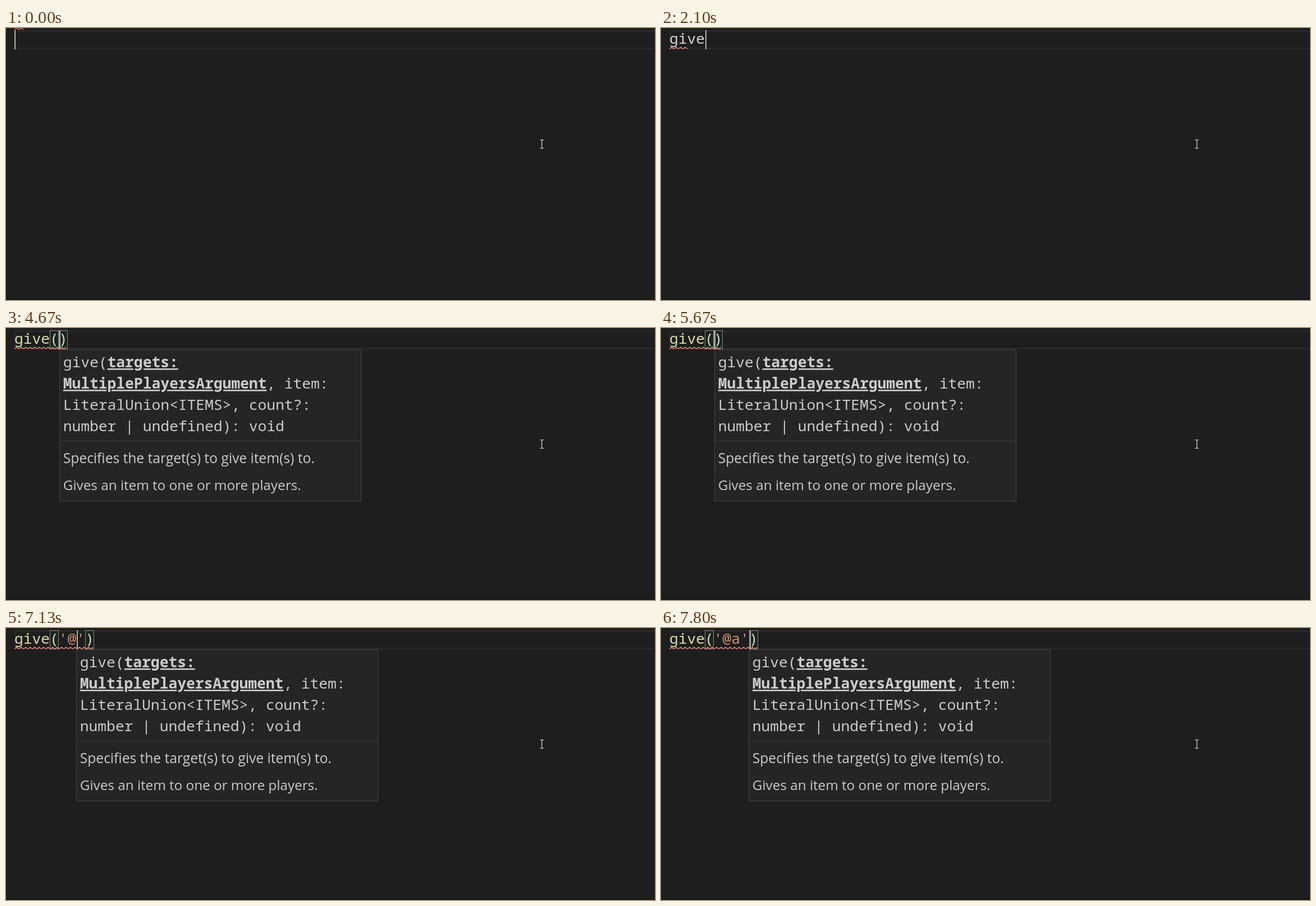
An HTML page for the animation above (8 s loop, 1156 by 485 pixels).

```html
<!DOCTYPE html>
<html lang="en">
<head>
<meta charset="utf-8">
<title>Typing a function call</title>
<style>
html, body { margin: 0; width: 100%; height: 100%; overflow: hidden; background: #1e1e1e; }
svg { display: block; width: 1156px; height: 485px; }
text { white-space: pre; }
.code { font: 26.27px "Noto Sans Mono", "DejaVu Sans Mono", monospace; fill: #d4d4d4; font-variant-ligatures: none; }
.doc { font: 24.6px "Open Sans", "Noto Sans", sans-serif; fill: #cccccc; }
.note { font-size: 24.25px; }
.tip { fill: #cccccc; }
.active { font-weight: 700; text-decoration: underline; text-decoration-thickness: 2px; }
.squiggle { fill: none; stroke: #f48771; stroke-width: 1.3; }
.bracket { fill: rgba(0, 100, 0, .1); stroke: #888888; stroke-width: 1; }
.panel { fill: #252526; stroke: #454545; }
</style>
</head>
<body>
<svg viewBox="0 0 1156 485">
  <rect width="1156" height="485" fill="#1e1e1e"/>
  <path d="M1156 5.5H16.5V36.5H1156" fill="none" stroke="#282828" stroke-width="3"/>
  <rect y="482" width="1156" height="3" fill="#1a1a1a"/>

  <g id="list">
    <rect class="panel" x="15.5" y="38.5" width="836" height="409"/>
    <rect x="16" y="39" width="835" height="34" fill="#062f4a"/>
    <text class="code" x="57" y="64"><tspan fill="#18a3ff" font-weight="700">gi</tspan>ve</text>
  </g>

  <rect id="open" class="bracket" y="4.5" width="15" height="33"/>
  <rect id="close" class="bracket" y="4.5" width="15" height="33"/>
  <text id="line" class="code" x="15" y="28"></text>
  <path id="oldError" class="squiggle"/>
  <path id="error" class="squiggle"/>
  <rect id="caret" y="4" width="2" height="34" fill="#aeafad"/>

  <g id="tip">
    <rect class="panel" x=".5" y="38.5" width="537" height="270"/>
    <path d="M1 201.5H537" stroke="#3a3a3b"/>
    <g class="code">
      <text class="tip" x="6.8" y="70">give(<tspan class="active">targets:</tspan></text>
      <text class="tip" x="6.8" y="108"><tspan class="active">MultiplePlayersArgument</tspan>, item:</text>
      <text class="tip" x="6.8" y="146">LiteralUnion&lt;ITEMS&gt;, count?:</text>
      <text class="tip" x="6.8" y="184">number | undefined): void</text>
    </g>
    <text class="doc" x="6.8" y="241">Specifies the target(s) to give item(s) to.</text>
    <text class="doc note" x="6.8" y="289">Gives an item to one or more players.</text>
  </g>

  <path d="M951 199.5H953.5L954.5 200.5L955.5 199.5H958M954.5 200V214M951 214.5H953.5L954.5 213.5L955.5 214.5H958"
        fill="none" stroke="#dddddd" stroke-width="1.2"/>
</svg>
<script>
const LOOP = 8000, LEFT = 15, CHAR = 15.76;
const BLUE = '#9cdcfe', PLAIN = '#d4d4d4', YELLOW = '#dcdcaa', STRING = '#ce9178';
const $ = id => document.getElementById(id);

// start time, text, caret column, colour of the first word
const edits = [
  [0, '', 0, PLAIN],
  [1300, 'g', 1, BLUE],
  [1400, 'gi', 2, BLUE],
  [2070, 'give', 4, PLAIN],
  [2270, 'give', 4, YELLOW],
  [2670, 'give()', 5, YELLOW],
  [6630, "give('')", 6, YELLOW],
  [7030, "give('@')", 7, YELLOW],
  [7300, "give('@a')", 8, YELLOW],
  [7630, "give('@a')", 9, YELLOW]
];
// start time, underlined columns
const errors = [[0, 0], [1700, 2], [2270, 4], [2670, 6], [6630, 8], [7030, 9], [7300, 10]];
// start time, left edge of the signature help
const tipSteps = [
  [0, null], [2970, 95], [6630, 107], [6670, 111], [7030, 119], [7080, 123],
  [7130, 125], [7300, 137], [7340, 141], [7630, 153], [7670, 156]
];
// the caret flips at each of these times
const blinks = [230, 730, 1230, 1300, 1900, 2070, 2600, 2670, 3170, 3670, 4170, 4670, 5170, 5670, 6170, 6630];

const at = (steps, t) => steps.filter(s => s[0] <= t).pop();
const show = (el, on) => el.setAttribute('display', on ? 'inline' : 'none');

function wave(width, y) {
  let d = `M${LEFT} ${y + 3}`;
  for (let x = 4, up = true; x <= width + 1; x += 4, up = !up) d += `L${LEFT + x} ${up ? y : y + 3}`;
  return d;
}

function colourText(text, first) {
  const parts = text.match(/\w+(?=\(|$)|[()]|'.*'/g) || [];
  $('line').replaceChildren(...parts.map(part => {
    const span = document.createElementNS('http://www.w3.org/2000/svg', 'tspan');
    span.textContent = part;
    span.style.fill = part[0] === "'" ? STRING : /[()]/.test(part) ? PLAIN : first;
    return span;
  }));
}

function placeBracket(el, column) {
  show(el, column >= 0);
  el.setAttribute('x', Math.round(LEFT + column * CHAR) + .5);
}

let current;
function draw(t) {
  const edit = at(edits, t);
  const [, text, column, first] = edit;
  if (edit !== current) {
    current = edit;
    colourText(text, first);
    placeBracket($('open'), text.indexOf('('));
    placeBracket($('close'), text.indexOf(')'));
    $('caret').setAttribute('x', Math.ceil(LEFT + column * 15.81));
  }
  show($('caret'), blinks.filter(b => b <= t).length % 2 === 0);
  show($('list'), t >= 1500 && t < 2070);
  show($('oldError'), t < 1700);

  const marked = at(errors, t)[1];
  show($('error'), marked > 0);
  $('error').setAttribute('d', wave(marked * CHAR, 34.3));

  const left = at(tipSteps, t)[1];
  show($('tip'), left !== null);
  $('tip').setAttribute('transform', `translate(${left || 0} 0)`);
}

$('oldError').setAttribute('d', wave(16, 0));
const start = performance.now();
function frame() {
  draw((performance.now() - start) % LOOP);
  requestAnimationFrame(frame);
}
frame();
</script>
</body>
</html>
```
